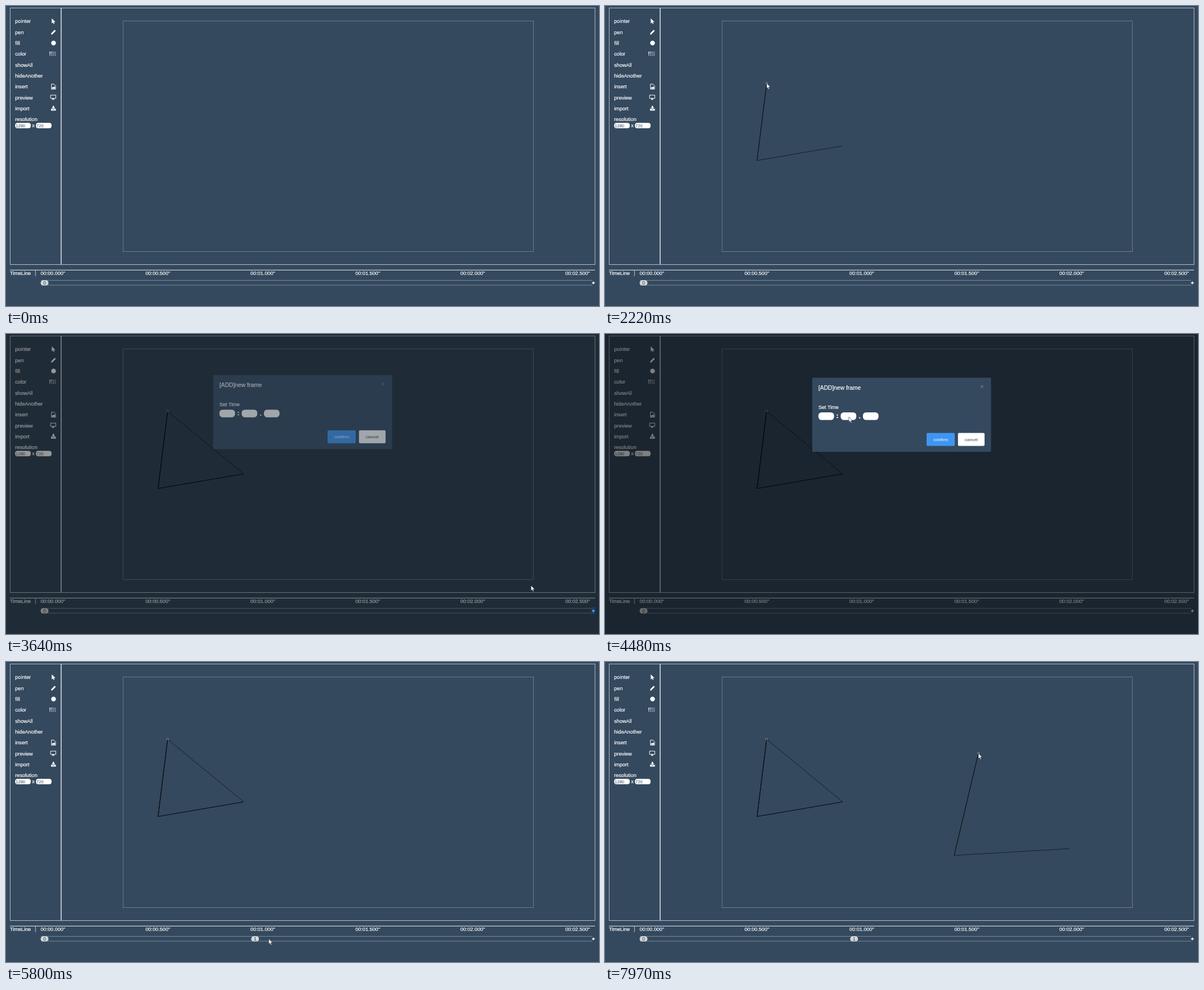
An HTML page that plays this animation: 1053x532 px, repeating every 8000 ms.

```html
<!DOCTYPE html>
<html lang="en">
<head>
<meta charset="utf-8">
<title>Timeline editor</title>
<style>
  html, body { margin: 0; width: 100%; height: 100%; overflow: hidden; background: #34495e; }
  svg { display: block; width: 1053px; height: 532px; }
  text { font: 9.1px "Liberation Sans", Arial, sans-serif; fill: #fff; stroke: #fff; stroke-width: .2; }
  .dark { fill: #34495e; stroke: none; }
  .small { font-size: 7.6px; }
  .button { font-size: 8px; text-anchor: middle; stroke: none; }
  .title { font-size: 10.25px; }
  .line { fill: none; stroke: #fff; }
  .border { fill: none; stroke: #c3cad0; stroke-width: .9; }
  .track { stroke: #8f9aa5; stroke-width: .8; }
  .pill { fill: #d3d7db; }
  .white { fill: #fff; }
  .pen { fill: none; stroke: #000; stroke-width: .6; }
  .marker { fill: none; stroke: #a9b3bd; stroke-width: .7; }
  .mouse { fill: #fff; stroke: #1b2530; stroke-width: .6; stroke-linejoin: round; }
</style>
</head>
<body>
<svg viewBox="0 0 1053 532">
  <rect width="1053" height="532" fill="#34495e"/>
  <rect class="border" x="7.4" y="3.5" width="1038.6" height="455"/>
  <path class="line" d="M97.9 4V458" stroke-width="1.3"/>
  <rect x="208" y="26.5" width="728.5" height="409" fill="none" stroke="#74808a" stroke-width=".9"/>

  <g id="menu"></g>
  <g class="white">
    <path d="M81.3 22v9l2.1-2 1.4 3 1.4-.6-1.4-3h3z"/>
    <path d="M80 51l.6-3 5-5q1-1 2 0t0 2l-5 5z"/>
    <circle cx="84.4" cy="65.6" r="4.2"/>
    <path class="line" d="M80.7 138.5h4.5l2.8 3v6h-7.3z"/>
    <path d="M81.5 146.5v-1.500l1.500-1.500 1 1 1.500-2 1.700 2v2z"/>
    <path class="line" d="M79.2 158h9.200v5.800h-9.200z"/>
    <path d="M82.5 164h2.600l.7 2.200h-4z"/>
    <path d="M83 177h2.400v3h2l-3.200 3-3.200-3h2zM80 182.300h2.300l1.900 1.700 1.900-1.700h2.500v3.300H80z"/>
  </g>
  <g id="swatches" class="white"></g>

  <path class="line" d="M7 468.3H1046" stroke-width=".9"/>
  <path class="line" d="M52.3 469v10" stroke-width=".7"/>
  <text x="7" y="477">TimeLine</text>
  <g id="ruler"></g>
  <path class="track" d="M62 486.500H1041M62 495H1041"/>
  <g id="keys"></g>
  <rect id="selection" x="1040" y="484.5" width="6" height="12" fill="#0a6fdc"/>
  <path class="line" d="M1040.4 491h5.200M1043 488.400v5.200" stroke-width="1.4"/>

  <g id="drawing"></g>
  <rect id="shade" width="1053" height="532"/>

  <g id="dialog">
    <rect x="368" width="317.5" height="131.5" rx="1" fill="#34495e"/>
    <text class="title" x="379" y="21.6">[ADD]new frame</text>
    <path d="M666.8 13.300l5 5m0-5l-5 5" stroke="#909399" stroke-width=".8"/>
    <text x="379" y="55.5">Set Time</text>
    <g id="fields"></g>
    <path class="white" d="M411.4 65.300h2.300v1.800h-2.300zM411.4 69.600h2.300v1.800h-2.300zM451 70.200h2.300v1.800h-2.300z"/>
    <text id="digit" class="small dark" x="426.2" y="71">1</text>
    <rect id="confirm" x="571" y="98" width="50" height="23" rx="2"/>
    <text class="button" x="596" y="112.4">confirm</text>
    <rect class="white" x="626.8" y="98" width="47.2" height="23" rx="2"/>
    <text class="button dark" x="650.3" y="112.4">cancel</text>
  </g>

  <g id="mouse" class="mouse">
    <path id="arrow" d="M0 0v9.300l2.100-1.900 1.500 3.500 1.600-.7-1.500-3.400h3z"/>
    <path id="hand" d="M-.8 .8q.9-1.400 1.800 0v3.600l4 .9q1 .3 .9 1.500l-.7 4.700h-5L-3 7.200q-.4-1.300 1-1.100l1.200 1z"/>
  </g>
</svg>
<script>
const LOOP = 8000, OPEN = 3540, CLOSE = 5150;
const $ = id => document.getElementById(id);
const clamp = v => Math.min(1, Math.max(0, v));
const repeat = (n, make) => Array.from({ length: n }, (_, i) => make(i)).join('');
const text = (x, y, label, style = '') => `<text x="${x}" y="${y}" class="${style}">${label}</text>`;
const box = (x, y, w, h, style, rx = 0) =>
  `<rect x="${x}" y="${y}" width="${w}" height="${h}" rx="${rx}" class="${style}"/>`;

const items = ['pointer', 'pen', 'fill', 'color', 'showAll', 'hideAnother', 'insert', 'preview', 'import', 'resolution'];
$('menu').innerHTML =
  repeat(items.length, i => text(16.3, 30.2 + i * 19.35, items[i])) +
  repeat(2, i => box(16.3 + i * 36.9, 207.3, 27.7, 9.5, 'white', 4) +
    text(17.2 + i * 36.9, 214.6, [1280, 720][i], 'small dark')) +
  text(46.2, 215, 'x');
$('menu').children[items.indexOf('fill')].style.fill = '#ffe6dd';

$('swatches').innerHTML = repeat(12, i => {
  const column = i % 4, row = Math.floor(i / 4);
  return `<g opacity="${column + row < 2 ? .9 : .5}">` + box(77 + column * 3.1, 81 + row * 2.7, 2, 1.8) + '</g>';
});
$('ruler').innerHTML = repeat(6, i =>
  text(61.4 + i * 186.35, 477, `00:${(i / 2).toFixed(3).padStart(6, '0')}"`));
$('keys').innerHTML = repeat(2, i => {
  const x = 61.5 + i * 373.8;
  return `<g>${box(x, 486.3, 14, 9.3, 'pill', 4.6)}${text(x + 4.5, 494, i, 'dark')}</g>`;
});
$('fields').innerHTML = repeat(3, i => box(379 + i * 39.5, 61.5, 27.7, 13.5, 'white', 5.5));

// Mouse stops: x, y, arrival, departure. The pen clicks at the end of each stop's approach.
const first = [[287, 137, 860, 930], [270, 274, 1190, 1220], [422, 248, 1440, 1490], [287, 137, 2220, 2400]];
const second = [[663, 162, 6440, 6560], [620, 343, 6920, 6990], [824, 331, 7300, 7400], [663, 162, 7950, LOOP]];
const stops = [
  [984, 521, 0, 80], ...first,
  [1043, 488, 3250, 3560],      // add a key
  [934, 447, 3640, 3640],
  [433, 147, 4200, 4850],       // seconds field
  [602, 188, 5120, 5250],       // confirm
  [467, 491, 5800, 5800],
  [441, 491, 5930, 6040],       // select the key
  ...second
];

// Every click strokes the whole path again, so older edges grow darker.
const draw = corners => corners.map(([x, y, , at], i) => {
  const points = corners.slice(0, i + 1).map(p => p.slice(0, 2)).join(' ');
  return i
    ? `<polyline class="pen" data-at="${at}" points="${points}"/>`
    : `<g data-at="${at}">${box(x - 1.2, y - 1.1, 2.8, 2.8, 'marker')}</g>`;
}).join('');
$('drawing').innerHTML = draw(first) + draw(second);
const timed = [...$('drawing').children];

function position(t) {
  const i = Math.max(1, stops.findIndex(s => s[2] > t));
  if (t >= stops.at(-1)[2]) return stops.at(-1);
  const [x0, y0, , leave] = stops[i - 1], [x1, y1, arrive] = stops[i];
  const p = clamp((t - leave) / (arrive - leave)), s = p * (2 - p);
  return [x0 + (x1 - x0) * s, y0 + (y1 - y0) * s];
}

// The CSS "ease" curve: cubic-bezier(.25, .1, .25, 1)
function ease(x) {
  x = clamp(x);
  let lo = 0, hi = 1, u;
  for (let i = 0; i < 20; i++) {
    u = (lo + hi) / 2;
    if (.75 * u * (1 - u) + u ** 3 < x) lo = u; else hi = u;
  }
  return .3 * u * (1 - u) ** 2 + 3 * u * u * (1 - u) + u ** 3;
}

const fade = (t, span) => ease((t - OPEN) / span) - ease((t - CLOSE) / span);
const show = (el, on) => el.style.display = on ? '' : 'none';

function render(t) {
  timed.forEach(el => show(el, t >= +el.dataset.at));

  const open = fade(t, 300);
  $('shade').setAttribute('opacity', fade(t, 200) / 2);
  show($('dialog'), open > .001);
  $('dialog').setAttribute('opacity', open);
  $('dialog').setAttribute('transform', `translate(0 ${77.5 - 11.4 * (1 - open)})`);
  show($('digit'), t >= 4600);
  show($('keys').children[1], t >= CLOSE);
  show($('selection'), t >= 3400 && t < 4350);

  const [x, y] = position(t);
  const hovering = open > .3 && x > 571 && x < 621 && y > 174 && y < 198;
  $('confirm').setAttribute('fill', hovering ? '#58a4ee' : '#3f96f2');
  show($('mouse'), t >= 80);
  $('mouse').setAttribute('transform', `translate(${x} ${y})`);
  show($('arrow'), !hovering);
  show($('hand'), hovering);
}

const start = performance.now();
function tick() {
  render((performance.now() - start) % LOOP);
  requestAnimationFrame(tick);
}
tick();
</script>
</body>
</html>
```
